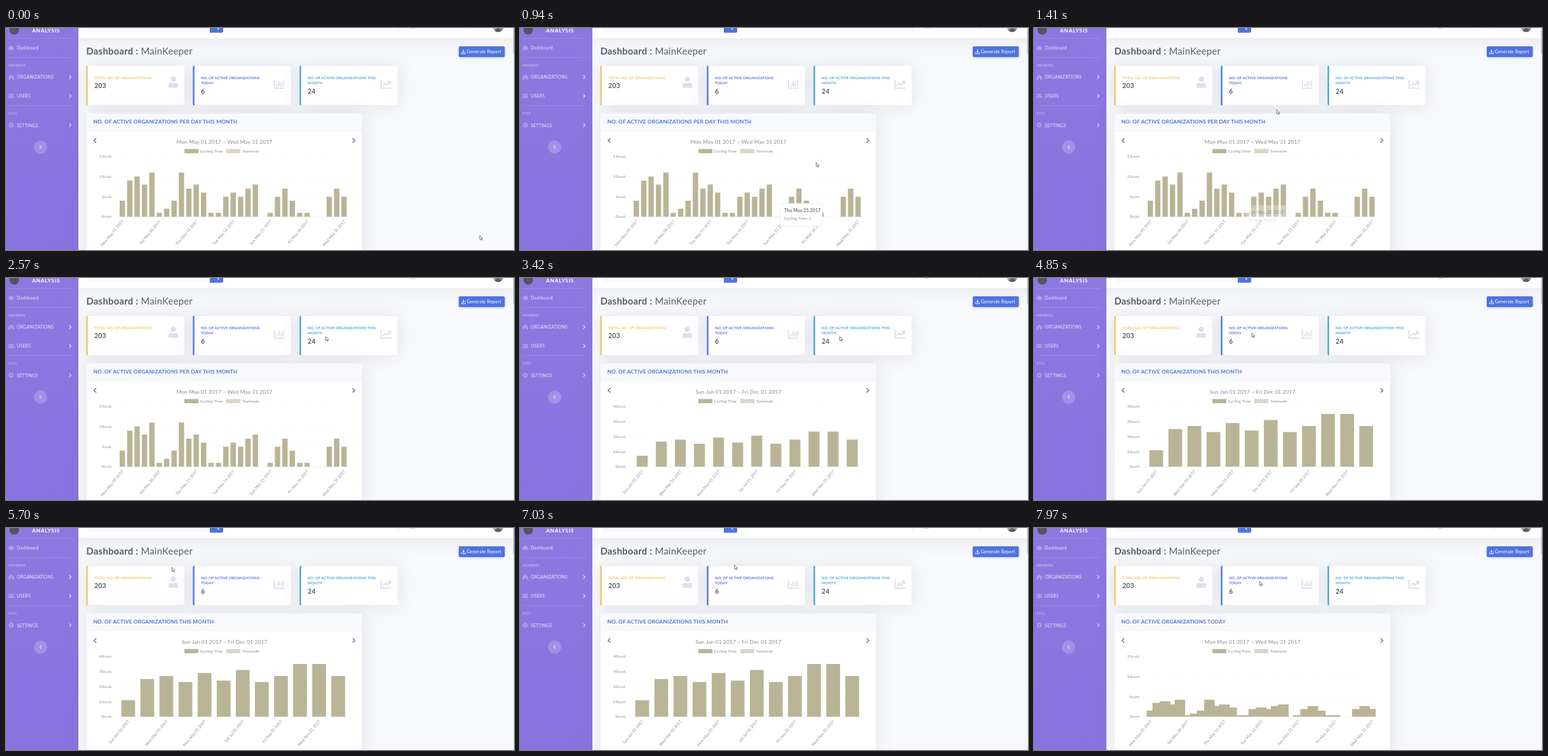
An HTML page that plays this animation: 800 px wide and 351 px high, repeating every 8 s.

```html
<!DOCTYPE html>
<html lang="en">
<head>
<meta charset="utf-8">
<title>Dashboard</title>
<style>
html,body{margin:0;width:100%;height:100%;overflow:hidden;background:#f8f9fc}
svg{display:block;width:100%;height:100%}
text{font-family:Lato,"Open Sans",sans-serif;letter-spacing:.018em;white-space:pre}
.b{font-weight:700}
.shadow{filter:drop-shadow(0 1px 14px rgba(58,59,69,.11))}
.small{font-size:5.8px;font-weight:700}
.value{font-size:10.5px;font-weight:700;fill:#5a5c69}
.nav{font-size:7px;fill:#fff;fill-opacity:.82}
.sec{font-size:5.3px;font-weight:700;fill:#fff;fill-opacity:.45}
.axis{font-size:6.15px;fill:#858796}
.line{fill:none;stroke-linecap:round;stroke-linejoin:round}
</style>
</head>
<body>
<svg viewBox="0 0 800 351" preserveAspectRatio="none">
  <defs>
    <linearGradient id="side" x1="0" y1="0" x2="0" y2="1">
      <stop offset="0" stop-color="#8d78e0"/><stop offset="1" stop-color="#8973df"/>
    </linearGradient>
    <linearGradient id="face" x1="0" y1="0" x2="1" y2="1">
      <stop offset="0" stop-color="#c4c1c3"/><stop offset="1" stop-color="#858289"/>
    </linearGradient>
    <clipPath id="plot"><rect x="177.5" y="200" width="360.7" height="98.7"/></clipPath>
  </defs>
  <rect width="800" height="351" fill="#f8f9fc"/>

  <!-- top bar -->
  <rect class="shadow" x="100" y="-20" width="720" height="36" fill="#fff"/>
  <path d="M130-5H321V6.500H133Q130 6.500 130 4Z" fill="#f8f9fc"/>
  <path d="M321-5H342V5Q342 7.500 339.500 7.500H321Z" fill="#4e73df"/>
  <path d="M333 0l2 2" class="line" stroke="#fff" stroke-width="1.200"/>
  <path d="M618.500 0V5" stroke="#e3e6f0" stroke-width=".6"/>
  <g font-size="6.500" fill="#858796">
    <text x="630" y="0">Logged in</text><text x="714" y="0">keeper,</text>
  </g>
  <circle cx="775" cy="-1.500" r="8" fill="url(#face)"/>
  <path d="M769.500 4Q775-3 780.500 4Q775 8.500 769.500 4Z" fill="#5c5a63"/>

  <!-- sidebar -->
  <rect width="114" height="351" fill="url(#side)"/>
  <circle cx="13" cy="3" r="7.500" fill="#55545f"/>
  <text class="b" x="41" y="6.500" font-size="8.400" fill="#fff" style="letter-spacing:.7px">ANALYSIS</text>
  <path d="M4 16.500H104M4 46.500H104M4 122.500H104" stroke="#fff" stroke-opacity=".18" stroke-width=".7"/>
  <g fill="#fff" fill-opacity=".3">
    <path d="M4.500 34.500A4.300 4.300 0 1 1 12 34.500Z"/>
    <path d="M4 77L8.300 73.500 12.600 77V81.500H9.500V78.500H7V81.500H4Z"/>
    <circle cx="8.300" cy="105.500" r="1.700"/><circle cx="5.400" cy="105.300" r="1.200"/><circle cx="11.200" cy="105.300" r="1.200"/>
    <path d="M3.700 109.500Q3.700 107 6 107Q8.300 108.500 10.600 107Q13 107 13 109.500V110.500H3.700Z"/>
  </g>
  <g fill="none" stroke="#fff" stroke-opacity=".3">
    <circle cx="8.300" cy="153.800" r="2.300" stroke-width="1.900"/>
    <circle cx="8.300" cy="153.800" r="3.700" stroke-dasharray="1.450" stroke-width="1.100"/>
  </g>
  <text class="nav" x="17" y="33.700">Dashboard</text>
  <text class="sec" x="4" y="60.500">MEMBERS</text>
  <text class="nav" x="17" y="80.200">ORGANIZATIONS</text>
  <text class="nav" x="17" y="110">USERS</text>
  <text class="sec" x="4" y="136.500">ETCS</text>
  <text class="nav" x="17" y="156.500">SETTINGS</text>
  <path class="line" d="M100 75l2.500 2.500-2.500 2.500M100 105l2.500 2.500-2.500 2.500M100 151.200l2.500 2.500-2.500 2.500" stroke="#fff" stroke-opacity=".75" stroke-width="1.200"/>
  <circle cx="54.500" cy="188.300" r="10.500" fill="#fff" fill-opacity=".2"/>
  <path class="line" d="M55.500 186l-2.200 2.300 2.200 2.300" stroke="#fff" stroke-opacity=".65" stroke-width="1.200"/>

  <!-- heading -->
  <text x="126.500" y="42" font-size="14.800" fill="#5a5c69"><tspan class="b">Dashboard :</tspan> MainKeeper</text>
  <rect x="713" y="29" width="72.500" height="17" rx="2" fill="#4e73df" style="filter:drop-shadow(0 1px 2px rgba(58,59,69,.2))"/>
  <path class="line" d="M720.500 34.500V38.500M718.700 37l1.800 1.800 1.800-1.800M717.500 39V40.700H723.500V39" stroke="#fff" stroke-width=".9"/>
  <text x="725.500" y="40.200" font-size="7.200" fill="#fff">Generate Report</text>

  <g id="cards"></g>
  <g fill="#dddfeb">
    <circle cx="263.500" cy="81" r="4.300"/>
    <path d="M256 94.500V91Q256 86.700 260 86.700Q263.500 88.300 267 86.700Q271 86.700 271 91V94.500Z"/>
  </g>
  <g class="line" stroke="#dddfeb" stroke-width="2">
    <path d="M422.700 83V95.300H438M590.700 83V95.300H606"/>
    <path d="M426.700 91.500V89M430 91.500V85M433.300 91.500V87M436.700 91.500V84"/>
    <path d="M594 91l3.200-3.600 3.200 2.600 4.600-5M601.700 84.600H605.400V88.300"/>
  </g>

  <!-- chart card -->
  <rect class="shadow" x="126.500" y="135.300" width="434.500" height="260" rx="2.500" fill="#fff" stroke="#e3e6f0" stroke-width=".5"/>
  <path d="M126.800 162.500V138Q126.800 135.600 129.200 135.600H558.300Q560.700 135.600 560.700 138V162.500Z" fill="#f8f9fc"/>
  <path d="M126.500 162.500H561" stroke="#e9ebf3" stroke-width=".6"/>
  <text id="title" class="b" x="137.500" y="151.300" font-size="8.350" fill="#4e73df">NO. OF ACTIVE ORGANIZATIONS <tspan></tspan></text>
  <path class="line" d="M141.700 174.700l-3 3 3 3M546.300 174.700l3 3-3 3" stroke="#6e707e" stroke-width="1.400"/>
  <text id="range" x="344" y="183" font-size="8.400" fill="#858796" text-anchor="middle"></text>
  <rect x="281" y="191.300" width="22" height="6.700" fill="#bab497"/>
  <rect x="347" y="191.300" width="22" height="6.700" fill="#dbd5c7"/>
  <text class="axis" x="305.500" y="196.800">Cycling Time</text>
  <text class="axis" x="372" y="196.800">Taximode</text>
  <g id="axes"></g>
  <path id="bars" fill="#bab497" clip-path="url(#plot)"/>
  <g id="tip">
    <rect width="66" height="36" rx="2" fill="#fff" stroke="#dddfeb" stroke-width=".6"/>
    <text class="b" x="6" y="13.500" font-size="7.100" fill="#6e707e"></text>
    <text class="axis" x="6" y="25.500"></text>
  </g>

  <rect x="798.500" width="1.500" height="351" fill="#f1f1f3"/>
  <rect x="798.700" width="1.300" height="41" fill="#c1c1c4"/>
  <circle id="click" r="6" fill="#ff0" fill-opacity=".47"/>
  <path id="mouse" d="M0 0V6.600L1.500 5.200 2.600 7.600 3.700 7.100 2.700 4.800H4.800Z" fill="#fff" stroke="#222" stroke-width=".6" stroke-linejoin="round"/>
</svg>
<script>
const $ = id => document.getElementById(id);
const LOOP = 8000, BASE = 298.5, TALL = 95.5, LEFT = 177.4, SPAN = 360.8;

const cards = [
  ['#ecc464', ['TOTAL NO. OF ORGANIZATIONS'], '203'],
  ['#4e73df', ['NO. OF ACTIVE ORGANIZATIONS', 'TODAY'], '6'],
  ['#46a5d2', ['NO. OF ACTIVE ORGANIZATIONS THIS', 'MONTH'], '24']
];
$('cards').innerHTML = cards.map(([color, lines, value], i) => {
  const x = 126.3 + 168 * i;
  const label = lines.map((s, n) =>
    `<text class="small" x="${x + 12.6}" y="${80.7 + 8.7 * n}" fill="${color}">${s}</text>`).join('');
  return `<rect class="shadow" x="${x}" y="59.700" width="154.900" height="62.500" rx="2.500" fill="#fff" stroke="#e3e6f0" stroke-width=".5"/>
    <path d="M${x + 2.4} 59.500V122.400Q${x} 122.400 ${x} 119.700V62.200Q${x} 59.500 ${x + 2.4} 59.500Z" fill="${color}"/>
    ${label}<text class="value" x="${x + 12.6}" y="${lines.length > 1 ? 104 : 95.3}">${value}</text>`;
}).join('');

const dateText = (month, day) => {
  const [w, m, d, y] = new Date(2017, month, day).toDateString().split(' ');
  return `${w} ${m} ${d} ${y}`;
};
const days = {
  max: 15, step: 5, every: 5, width: 8.4, date: i => dateText(4, i + 1),
  data: [4,9,10,8,11,1,2,4,11,7,8,6,1,1,5,6,5,7,8,0,1,5,7,4,1,1,0,0,5,7,5]
};
const months = {
  max: 40, step: 10, every: 2, width: 21.7, date: i => dateText(i, 1),
  data: [11,25,27,23,29,24,31,23,27,35,35,27]
};
const center = (set, i) => LEFT + SPAN * (i + .5) / set.data.length;
const level = (set, v) => BASE - TALL * v / set.max;

for (const set of [days, months]) {
  let out = '';
  for (let v = 0; v <= set.max; v += set.step) {
    const y = level(set, v);
    out += `<path d="M172.500 ${y}H538" stroke="${v ? '#f0f1f5' : '#e6e8ef'}" stroke-width=".6" stroke-dasharray="${v ? 1.5 : 0}"/>
      <text class="axis" x="167.300" y="${y + 1.9}" text-anchor="end">${v}cust.</text>`;
  }
  set.data.forEach((_, i) => {
    if (i % set.every) return;
    out += `<text class="axis" transform="translate(${center(set, i) + .6} 304.500) rotate(-50)" y="2.200" text-anchor="end">${set.date(i)}</text>`;
  });
  set.axes = document.createElementNS('http://www.w3.org/2000/svg', 'g');
  set.axes.innerHTML = out;
  $('axes').append(set.axes);
}

// from, set shown, previous set, growth start, title end, its colour
const scenes = [
  [0, days, days, -2000, 'PER DAY THIS MONTH', '#4e73df'],
  [3180, months, days, 3180, 'THIS MONTH', '#4e73df'],
  [7970, days, months, 7856, 'TODAY', '#6d7cae']
];

// runs of screen updates: first, last, count
const runs = [[0,0,1], [70,860,11], [940,1720,11], [1800,2240,7], [2390,2570,2], [3180,3420,4],
  [3540,3540,1], [3740,4530,11], [4600,5310,10], [5460,6250,11], [6330,7100,11], [7190,7270,2],
  [7660,7740,2], [7970,7970,1]];
const ticks = runs.flatMap(([a, b, n]) =>
  Array.from({length: n}, (_, i) => n > 1 ? a + (b - a) * i / (n - 1) : a));

// pointer path: time, x, y
const path = [[0,746,328], [860,487,220], [1180,404,190], [1410,382,128.5], [1720,380,104.5],
  [1980,438,91], [2240,503.5,92.5], [3660,503.5,92.5], [3980,421,123], [4250,376,77],
  [4530,362,95], [5310,314,74], [5380,313,74], [5700,261,62], [6000,206,42], [6250,223,25],
  [6480,252,19.5], [7100,350,64], [7190,352,67], [7270,355.5,84.5], [LOOP,355.5,84.5]];
function pointer(t) {
  const n = path.findIndex(p => p[0] > t);
  const [t0, x0, y0] = path[n - 1], [t1, x1, y1] = path[n];
  const k = (t - t0) / (t1 - t0);
  return [x0 + (x1 - x0) * k, y0 + (y1 - y0) * k];
}

const clamp = v => Math.max(0, Math.min(1, v));
const easeOut = v => 1 - (1 - clamp(v)) ** 4;
const ENTER = 670, LEAVE = 1180, FADE = 330, LAG = 25;

function hovered(t) {
  const x = pointer(Math.max(ENTER, Math.min(LEAVE, t)))[0];
  return Math.max(0, Math.min(30, Math.floor((x - LEFT) / SPAN * 31)));
}

function drawTip(t) {
  const alpha = Math.min(clamp((t - ENTER) / 200), 1 - clamp((t - LEAVE) / FADE));
  $('tip').setAttribute('opacity', alpha);
  if (!alpha) return;
  let x = 0, y = 0;
  for (let k = 0; k < 6; k++) {
    const i = hovered(t - k * LAG);
    x += center(days, i) / 6;
    y += level(days, days.data[i]) / 6;
  }
  const i = hovered(t), [title, body] = $('tip').querySelectorAll('text');
  $('tip').setAttribute('transform', `translate(${x - 72} ${y - 18})`);
  title.textContent = days.date(i);
  body.textContent = 'Cycling Time: ' + days.data[i];
}

function drawChart(t) {
  const [, set, prev, start, ending, color] = scenes.findLast(s => s[0] <= t);
  const p = easeOut((t - start) / 1000);
  const w = prev.width + (set.width - prev.width) * p;
  $('bars').setAttribute('d', set.data.map((v, i) =>
    `M${center(set, i) - w / 2} ${BASE}v${-TALL * v / set.max * p}h${w}V${BASE}Z`).join(''));
  for (const s of [days, months]) s.axes.style.display = s === set ? '' : 'none';
  const end = $('title').querySelector('tspan');
  end.textContent = ending;
  end.setAttribute('fill', color);
  $('range').textContent = set.date(0) + ' ~ ' + set.date(set.data.length - 1);
}

function draw(t) {
  const [x, y] = pointer(t);
  const pressed = t >= 2390 && t < 2570 || t >= 7660 && t < 7740;
  $('mouse').setAttribute('transform', `translate(${x} ${y})`);
  $('click').setAttribute('transform', `translate(${x} ${y})`);
  $('click').style.display = pressed ? '' : 'none';
  drawChart(t);
  drawTip(t);
}

const begin = performance.now();
let shown = -1;
function loop() {
  const now = (performance.now() - begin) % LOOP;
  const t = ticks.findLast(v => v <= now + .5);
  if (t !== shown) draw(shown = t);
  requestAnimationFrame(loop);
}
loop();
</script>
</body>
</html>
```
